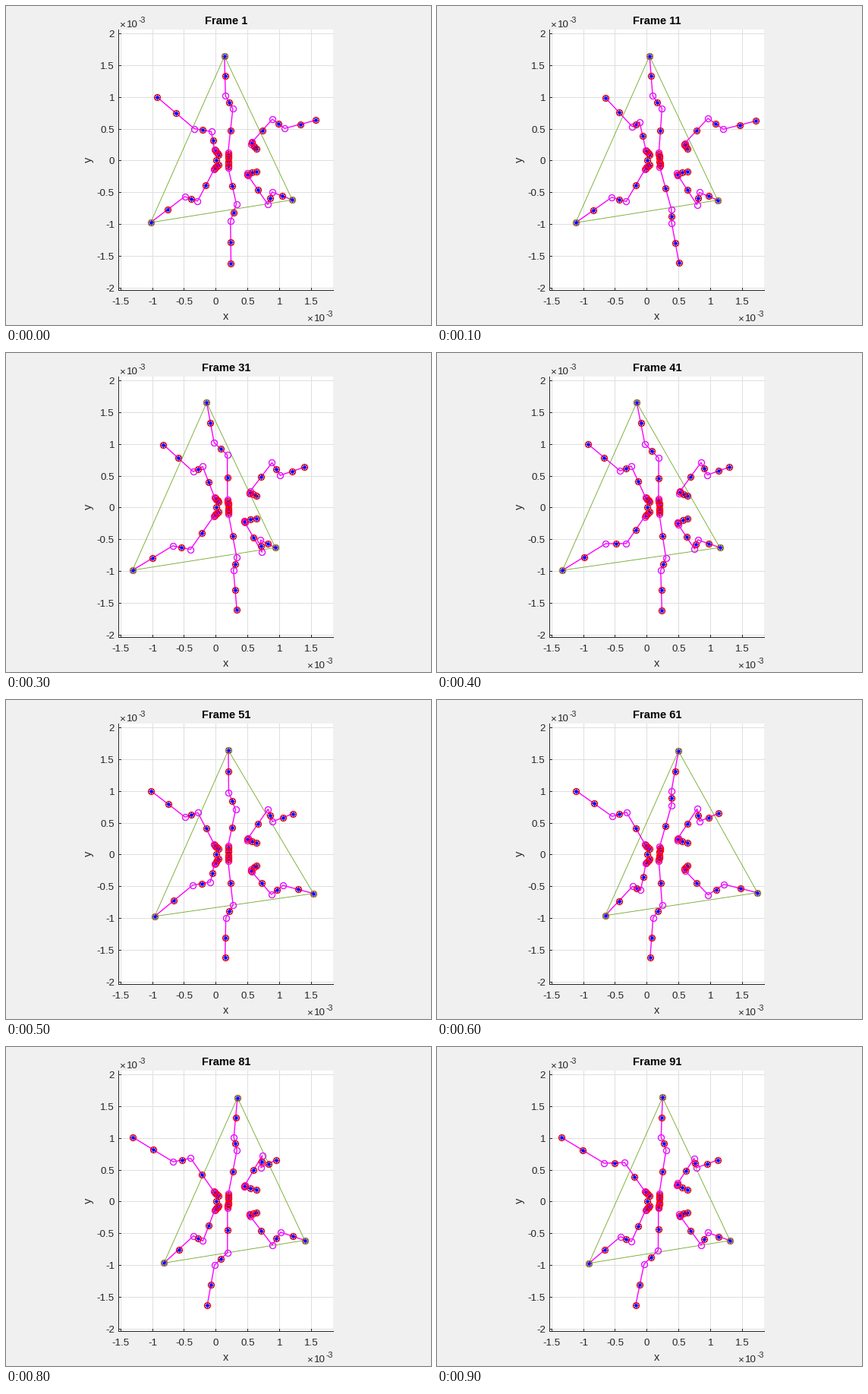
Recreate the animation shown at these times as a matplotlib script. Size 560 by 420 pixels, loop 1 s.

```python
import numpy as np
import matplotlib.pyplot as plt
from matplotlib.animation import FuncAnimation

W, H, DPI = 560, 420, 100
PT = 72 / DPI                      # points per pixel
X0, Y0, SCALE = 276.2, 203.4, 83.65
LEFT, RIGHT, TOP, BOTTOM = 148, 431, 31, 374
DARK, GREEN = "#262626", "#77ac30"
MID_Y = 202.5                      # mirror line between upper and lower legs

PERIOD, HALF = 102, 51             # gait cycle in simulation steps
TOUCH_DOWN, LIFT_OFF = 12, 88      # the foot is on the ground in between

plt.rcParams["font.family"] = "Liberation Sans"


class Leg:
    """Upper leg whose foot, knee, hip and coxa shift with stride and lift."""

    def __init__(self, rest, stride, lift, shoulder, mount, phase=0, sharpness=1):
        self.rest, self.stride, self.lift = map(np.array, (rest, stride, lift))
        self.shoulder, self.mount = shoulder, mount
        self.phase, self.sharpness = phase, sharpness

    def joints(self, step, upper):
        stride, lift = gait(step + self.phase + (0 if upper else HALF))
        pose = self.rest + stride * self.stride + lift ** self.sharpness * self.lift
        points = np.vstack([pose, pose[-1] + self.shoulder, self.mount])
        if not upper:
            points[:, 1] = 2 * MID_Y - points[:, 1]
        return points - (0.6, 0)


def gait(step):
    """Stride from 1 (front) to -1 (back) on the ground, eased return with a lift."""
    u = (step - TOUCH_DOWN) % PERIOD
    ground = LIFT_OFF - TOUCH_DOWN
    if u < ground:
        return 1 - 2 * u / ground, 0
    swing = np.pi * (u - ground) / (PERIOD - ground)
    return -np.cos(swing), np.sin(swing)


LEGS = [
    Leg(rest=[(192.8, 120), (237.2, 154.3), (253.7, 148.3), (275, 189.9)],
        stride=[(30.3, 1.2), (20, 3.8), (12, 2.3), (0.9, 0)],
        lift=[(0, 0), (7, 6.5), (15, 17), (0, -1)],
        shoulder=(2, 2.7), mount=(281, 196)),
    Leg(rest=[(290, 66.2), (290.8, 118.5), (300, 135.2), (293.2, 193.1)],
        stride=[(29.6, 1), (19, 0.6), (9.3, 1.2), (0.9, 0)],
        lift=[(0, 0), (1, 3.3), (2, 9), (0, -1.3)],
        shoulder=(0.3, 3.5), mount=(294, 200), phase=HALF),
    Leg(rest=[(379.3, 149.8), (352.2, 160.2), (346.2, 143.8), (319.7, 182)],
        stride=[(28.3, 1.3), (19.3, 1.8), (9.8, 1.2), (5.2, 0.3)],
        lift=[(23, 0.3), (11, 0.5), (3, 5), (4, -3)],
        shoulder=(-1, 2.7), mount=(331, 187.5), sharpness=0.25),
]
BODY = (276.5, 202.7)

fig = plt.figure(figsize=(W / DPI, H / DPI), dpi=DPI, facecolor="#f0f0f0")
ax = fig.add_axes([0, 0, 1, 1])
ax.set(xlim=(0, W), ylim=(H, 0))
ax.axis("off")


def line(xs, ys, color, width, z):
    return ax.plot(xs, ys, color=color, lw=width * PT, zorder=z)[0]


def markers(marker, color, size, width, z):
    return ax.plot([], [], ls="none", marker=marker, mfc="none", mec=color,
                   ms=size * PT, mew=width * PT, zorder=z)[0]


def text(x, y, s, size=13.33, **kw):
    kw = {"color": DARK, "ha": "center", "va": "baseline", **kw}
    return ax.text(x, y, s, fontsize=size * PT, **kw)


def draw_axes():
    ax.add_patch(plt.Rectangle((LEFT, TOP), RIGHT - LEFT, BOTTOM - TOP,
                               fc="white", ec="none", zorder=0))
    for v in np.arange(-1.5, 1.6, 0.5):
        x = X0 + SCALE * v
        line([x, x], [TOP, BOTTOM], "#dfdfdf", 1, 1)
        line([x, x], [BOTTOM - 3, BOTTOM], DARK, 1, 2)
        text(x + 0.4, 393, f"{v:g}")
    for v in np.arange(-2, 2.1, 0.5):
        y = Y0 - SCALE * v
        line([LEFT, RIGHT], [y, y], "#dfdfdf", 1, 1)
        line([LEFT, LEFT + 3], [y, y], DARK, 1, 2)
        text(143, y + 5, f"{v:g}", ha="right")
    line([LEFT, LEFT], [TOP, BOTTOM], DARK, 1, 2)
    line([LEFT, RIGHT], [BOTTOM, BOTTOM], DARK, 1, 2)
    for x, y in [(149, 28), (396, 415)]:
        text(x, y, "×", ha="left")
        text(x + 10, y, "10", ha="left")
        text(x + 26, y - 6, "-3", 10.67, ha="left")
    text(290, 413, "x", 14.67)
    text(109, 202.5, "y", 14.67, rotation=90, va="center")


draw_axes()
title = text(290, 24, "", 14.67, color="black", weight="bold")
triangle = line([], [], GREEN, 0.9, 3)
limbs = [line([], [], "magenta", 1.4, 4) for _ in range(2 * len(LEGS))]
shadow = markers("o", "cyan", 8, 1, 5)
mass_stars = markers((8, 2, 0), "blue", 7.5, 0.8, 6)
joint_rings = markers("o", "magenta", 8, 1.3, 7)
mass_rings = markers("o", "red", 8, 1.3, 8)
foot_rings = markers("o", GREEN, 8, 0.9, 9)


def update(i):
    step = 10 * i + 1
    title.set_text(f"Frame {step}")
    chains = [leg.joints(step, upper) for upper in (True, False) for leg in LEGS]
    for limb, chain in zip(limbs, chains):
        limb.set_data(*chain.T)
    joints = np.vstack([c[1:5] for c in chains])
    masses = np.vstack([BODY] + [np.vstack([c[0], (c[:-1] + c[1:]) / 2, c[-1]])
                                 for c in chains])
    feet = np.array([chains[k][0] for k in (1, 3, 5)])
    for dots, points in [(shadow, joints), (joint_rings, joints), (mass_rings, masses),
                         (mass_stars, masses), (foot_rings, feet)]:
        dots.set_data(*points.T)
    triangle.set_data(*np.vstack([feet, feet[:1]]).T)
    return [title, triangle, *limbs, shadow, mass_stars, joint_rings, mass_rings, foot_rings]


anim = FuncAnimation(fig, update, frames=10, interval=100, repeat=True, repeat_delay=0)
plt.show()
```
